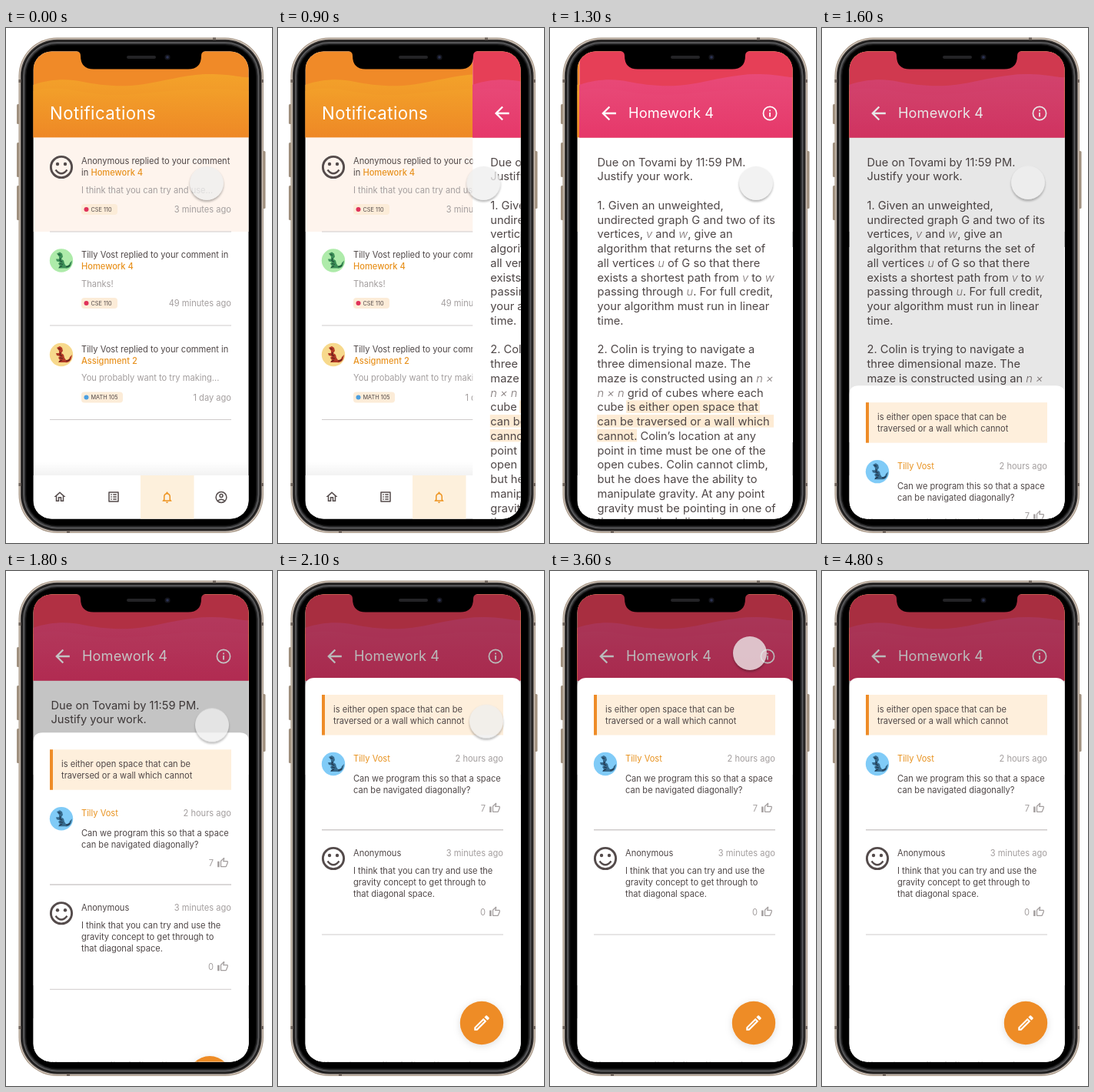
An HTML page for the animation above (4.9 s loop, 346x670 px).

```html
<!DOCTYPE html>
<html lang="en">
<head>
<meta charset="utf-8">
<title>Class notifications</title>
<style>
html, body { margin: 0; width: 100%; height: 100%; overflow: hidden; background: #fff; }
svg { display: block; width: 346px; height: 670px; font: 11.1px Inter, Roboto, sans-serif; }
text { fill: #4f4747; white-space: pre; }
.soft { fill: #a39e9e; }
.accent { fill: #e8921f; }
.link { fill: #e8921f; font-weight: 500; }
.tag { font-size: 7.3px; }
.head { font-size: 22.2px; letter-spacing: .45px; fill: #fff; }
.title { font-size: 18.2px; letter-spacing: .1px; fill: #fff; }
.body text { font-size: 14.65px; }
.var { font-style: italic; font-weight: 300; fill: #7d7474; }
</style>
</head>
<body>
<svg id="stage" viewBox="0 0 346 670"></svg>
<script>
const LOOP = 4900, TICK = 100;
const INK = '#544b4b', GREY = '#a39e9e', ORANGE = '#ee8c28', CREAM = '#feefdc';
const AUTHOR = 'Tilly Vost';

const ICONS = {
  home: 'M12 5.69l5 4.5V18h-2v-6H9v6H7v-7.81l5-4.5M12 3L2 12h3v8h6v-6h2v6h6v-8h3z',
  list: 'M19 5v14H5V5h14m1.1-2H3.9c-.5 0-.9.4-.9.9v16.2c0 .4.4.9.9.9h16.2c.4 0 .9-.5.9-.9V3.9c0-.5-.5-.9-.9-.9zM11 7h6v2h-6zm0 4h6v2h-6zm0 4h6v2h-6zM7 7h2v2H7zm0 4h2v2H7zm0 4h2v2H7z',
  bell: 'M12 22c1.1 0 2-.9 2-2h-4c0 1.1.9 2 2 2zm6-6v-5c0-3.07-1.63-5.64-4.5-6.32V4c0-.83-.67-1.5-1.5-1.5s-1.5.67-1.5 1.5v.68C7.64 5.36 6 7.92 6 11v5l-2 2v1h16v-1zm-2 1H8v-6c0-2.48 1.51-4.5 4-4.5s4 2.02 4 4.5z',
  thumb: 'M9 21h9c.83 0 1.54-.5 1.84-1.22l3.02-7.05c.09-.23.14-.47.14-.73v-2c0-1.1-.9-2-2-2h-6.31l.95-4.57.03-.32c0-.41-.17-.79-.44-1.06L14.17 1 7.58 7.59C7.22 7.95 7 8.45 7 9v10c0 1.1.9 2 2 2zM9 9l4.34-4.34L12 10h9v2l-3 7H9zM1 9h4v12H1z',
  pencil: 'M14.06 9.02l.92.92L5.92 19H5v-.92l9.06-9.06M17.66 3c-.25 0-.51.1-.7.29l-1.83 1.83 3.75 3.75 1.83-1.83c.39-.39.39-1.02 0-1.41l-2.34-2.34c-.2-.2-.45-.29-.71-.29zm-3.6 3.19L3 17.25V21h3.75L17.81 9.94z',
  back: 'M20 11H7.83l5.59-5.59L12 4l-8 8 8 8 1.41-1.41L7.83 13H20z'
};

const icon = (name, x, y, size, fill) =>
  `<path d="${ICONS[name]}" fill="${fill}" transform="translate(${x} ${y}) scale(${size / 24}) translate(-12 -12)"/>`;
const text = (x, y, s, cls = '', end = false) =>
  `<text x="${x}" y="${y}" class="${cls}"${end ? ' text-anchor="end"' : ''}>${s}</text>`;
const rect = (x, y, w, h, fill, rx = 0) =>
  `<rect x="${x}" y="${y}" width="${w}" height="${h}" fill="${fill}" rx="${rx}"/>`;
const disc = (x, y, r, fill) => `<circle cx="${x}" cy="${y}" r="${r}" fill="${fill}"/>`;
const ring = (x, y, r, stroke, w) =>
  `<circle cx="${x}" cy="${y}" r="${r}" fill="none" stroke="${stroke}" stroke-width="${w}"/>`;
const rule = (y, w = 1) => rect(57, y, 236, w, '#cfcbcb');
const band = (y, h, fill) => rect(35.5, y, 281, h, fill);
const fade = (id, top, bottom) =>
  `<linearGradient id="${id}" x2="0" y2="1"><stop stop-color="${top}"/><stop offset="1" stop-color="${bottom}"/></linearGradient>`;

const smiley = (x, y) => `<g transform="translate(${x} ${y})">
  ${ring(0, 0, 13.6, INK, 2.9)}${disc(-5, -4, 2.2, INK)}${disc(5, -4, 2.2, INK)}
  <path d="M-7.5 3.5Q0 13 7.5 3.5" fill="none" stroke="${INK}" stroke-width="2.4"/></g>`;

const dragon = (x, y, back, skin, dark) => `<g transform="translate(${x} ${y})">
  ${disc(0, 0, 15.2, back)}
  <path d="M-6-9l4-2 3 2 1 4-2 3 3 2 1 4 2 3q4 0 5-4l3-3-1 5q-2 6-8 5l-9 0 2-3-2-3 2-2-4-1-1-3 4 0 0-3z" fill="${skin}"/>
  <path d="M-4-8l3 1M-1-3l-1 3 3 2M-2 4l4 1M-3 9l4-2M6 8q4 0 5-2" fill="none" stroke="${dark}" stroke-width="1.2"/></g>`;

const header = (base, wave) => band(30, 112.5, base) +
  `<path d="M35 74C60 66 80 66 100 70S150 78 180 73S240 59 270 60S306 65 317 64V142.5H35z" fill="url(#${wave})"/>
   <path d="M35 82C70 72 95 86 140 87S230 74 317 82V142.5H35z" fill="url(#${wave})" opacity=".5"/>`;

function notice(y, avatar, lines, preview, course, dot, pill, time) {
  return avatar + text(98, y + 34, lines[0]) + text(98, y + 49, lines[1]) +
    text(98, y + 71.5, preview, 'soft') +
    rect(98, y + 86, pill, 14, '#fcecd8', 4) + disc(104.5, y + 93, 3, dot) +
    text(110.5, y + 95.7, course, 'tag') + text(293, y + 97, time, 'soft', true) + rule(y + 121.5);
}

const link = s => `<tspan class="link">${s}</tspan>`;
const replied = AUTHOR + ' replied to your comment in';

const inbox = band(30, 610, '#fff') + header('#f08a28', 'gold') +
  text(57, 118.5, 'Notifications', 'head') +
  band(142.5, 122.5, '#fef4ed') +
  notice(143, smiley(72, 181), ['Anonymous replied to your comment', 'in ' + link('Homework 4')],
    'I think that you can try and use...', 'CSE 110', '#e0325a', 47, '3 minutes ago') +
  notice(265, dragon(72, 302.5, '#aeebaa', '#3c8f57', '#1f4d36'), [replied, link('Homework 4')],
    'Thanks!', 'CSE 110', '#e0325a', 47, '49 minutes ago') +
  notice(387.5, dragon(72, 425, '#f7d98c', '#b23a26', '#5e1f1a'), [replied, link('Assignment 2')],
    'You probably want to try making...', 'MATH 105', '#4c9fe0', 54, '1 day ago') +
  band(564, 18, 'url(#lift)') + band(582, 58, '#fff') + rect(175, 582, 69.5, 58, '#fdf0dc') +
  icon('home', 70, 610, 18, INK) + icon('list', 140, 610, 18, INK) + icon('bell', 209.5, 610.5, 18, '#ee9420') +
  ring(280, 610.5, 6.9, INK, 1.5) + ring(280, 608.5, 2, INK, 1.5) +
  `<path d="M275.5 615Q280 611.5 284.5 615" fill="none" stroke="${INK}" stroke-width="1.5"/>`;

// _x_ marks a variable
const TASK = [
  'Due on Tovami by 11:59 PM.', 'Justify your work.', '',
  '1. Given an unweighted,', 'undirected graph G and two of its', 'vertices, _v_ and _w_, give an',
  'algorithm that returns the set of', 'all vertices _u_ of G so that there',
  'exists a shortest path from _v_ to _w_', 'passing through _u_. For full credit,',
  'your algorithm must run in linear', 'time.', '',
  '2. Colin is trying to navigate a', 'three dimensional maze. The', 'maze is constructed using an _n ×_',
  '_n × n_ grid of cubes where each', 'cube is either open space that', 'can be traversed or a wall which',
  'cannot. Colin’s location at any', 'point in time must be one of the', 'open cubes. Colin cannot climb,',
  'but he does have the ability to', 'manipulate gravity. At any point', 'gravity must be pointing in one of',
  'the six cardinal directions at any'
];
const lineY = i => 179.6 + 18.75 * i;
const task = band(30, 610, '#fff') + header('#e63f57', 'rose') +
  icon('back', 73.5, 111, 28, '#fff') + text(99, 117, 'Homework 4', 'title') +
  ring(283, 111, 8.6, '#fff', 1.7) + rect(282.1, 110, 1.8, 5.5, '#fff') + rect(282.1, 106.5, 1.8, 1.9, '#fff') +
  [[17, 96, 174], [18, 58, 230], [19, 58, 52]].map(([i, x, w]) =>
    rect(x, lineY(i) - 14, w, 16.5, '#fdebd4')).join('') +
  '<g class="body">' + TASK.map((s, i) =>
    text(58.5, lineY(i), s.replace(/_(.+?)_/g, '<tspan class="var">$1</tspan>'))).join('') + '</g>';

const comment = (y, avatar, name, cls, time, lines, gap, likes) =>
  avatar + text(98, y, name, cls) + text(293, y, time, 'soft', true) +
  lines.map((s, i) => text(98, y + gap + 15 * i, s)).join('') +
  text(270, y + gap + 15 * lines.length + 9.2, likes, 'soft', true) +
  icon('thumb', 282, y + gap + 15 * lines.length + 4.6, 15, GREY);

const sheet = '<path d="M35.5 640V151q0-12 12-12H304q12 0 12 12V640z" fill="#fff"/>' +
  rect(57, 161, 236, 52.5, CREAM) + rect(57, 161, 4, 52.5, ORANGE) +
  text(72, 184, 'is either open space that can be') + text(72, 199, 'traversed or a wall which cannot') +
  comment(247.7, dragon(72, 251, '#80cbf7', '#35698c', '#22354a'), AUTHOR, 'accent', '2 hours ago',
    ['Can we program this so that a space', 'can be navigated diagonally?'], 26, '7') +
  rule(336, 1.5) +
  comment(371, smiley(72, 374), 'Anonymous', '', '3 minutes ago',
    ['I think that you can try and use the', 'gravity concept to get through to', 'that diagonal space.'], 22.7, '0') +
  rule(472.5) +
  `<g filter="url(#glow)">${disc(265, 588, 28.2, ORANGE)}</g>` + icon('pencil', 265, 588, 26, '#fff');

// nested outlines of the phone body: inset, colour
const outline = ([d, fill]) => rect(16.5 + d, 12.5 + d, 318.5 - 2 * d, 644.5 - 2 * d, fill, 50 - d);
const shell = [[14, 99, 26], [14, 149, 45], [14, 205, 45], [334, 160, 75]]
  .map(([x, y, h]) => rect(x, y, 3.5, h, '#a0907f', 1.5)).join('') +
  [[0, '#a89888'], [1.3, '#e0d5cb'], [2.3, '#4a4542'], [3.5, '#1c1b1b'], [5.5, '#5c5c5e'], [7, '#3a3a3c'], [8.5, '#111'], [10, '#000']]
    .map(outline).join('') +
  [[16.5, 67, 3, 4], [332, 67, 3, 4], [16.5, 592, 3, 4], [332, 592, 3, 4], [269, 12.5, 4, 3], [79, 654, 4, 3]]
    .map(b => rect(...b, '#6f645c')).join('');

const notch = '<path d="M92 30q5 1 5 6q0 17.5 17 17.5H237q17 0 17-17.5q0-5 5-6z" fill="#000"/>' +
  rect(157, 36, 38, 4, '#232326', 2) + disc(210, 38, 3.6, '#14151c') + disc(210, 38, 1.8, '#2b3354');

document.getElementById('stage').innerHTML = `<defs>
  ${fade('gold', '#f3a22a', '#ee8826')}${fade('rose', '#e84a78', '#e6386a')}
  <linearGradient id="lift" x2="0" y2="1"><stop stop-color="#000" stop-opacity="0"/><stop offset="1" stop-color="#000" stop-opacity=".05"/></linearGradient>
  <filter id="glow" x="-50%" y="-50%" width="200%" height="200%"><feDropShadow dx="0" dy="2" stdDeviation="5" flood-opacity=".13"/></filter>
  <filter id="blur" x="-50%" y="-50%" width="200%" height="200%"><feGaussianBlur stdDeviation="1.8"/></filter>
  <clipPath id="screen"><rect x="35.5" y="30.5" width="280" height="608" rx="24"/></clipPath>
  <mask id="outside"><rect x="-40" y="-40" width="80" height="80" fill="#fff"/><circle r="21.8"/></mask>
  </defs>${shell}
  <g clip-path="url(#screen)">${inbox}
    <g id="task">${task}</g>
    <rect id="dim" x="35" y="30" width="282" height="610"/>
    <g id="sheet">${sheet}</g>
  </g>${notch}
  <g id="touch"><g mask="url(#outside)"><circle cy="2" r="21.8" opacity=".32" filter="url(#blur)"/></g>
    <circle r="22" fill="#eeeeef" opacity=".77"/></g>`;

const move = (x, y) => ({ transform: `translate(${x}px, ${y}px)` });
const tracks = [];
// steps: [ms, properties, easing]
function track(id, steps) {
  const frames = steps.map(([ms, props, easing = 'linear']) => ({ offset: ms / LOOP, easing, ...props }));
  frames.push({ ...frames[frames.length - 1], offset: 1 });
  const anim = document.getElementById(id).animate(frames, { duration: LOOP, fill: 'both' });
  anim.pause();
  tracks.push(anim);
}
const glide = 'ease-in-out';
track('task', [[0, move(281, 0)], [680, move(281, 0), glide], [1350, move(0, 0)]]);
track('dim', [[0, { opacity: 0 }], [1350, { opacity: 0 }, glide], [1960, { opacity: 0.27 }]]);
track('sheet', [[0, move(0, 500)], [1350, move(0, 500), glide], [1960, move(0, 0)]]);
track('touch', [
  [0, move(261, 202)], [700, move(267, 202)], [1300, move(268, 202)], [1800, move(268, 200.5), 'ease-in'],
  [2800, move(290.5, 163)], [3200, move(282, 136)], [3600, move(260, 107), 'ease-in'], [4200, move(222, -40)]
]);

const start = performance.now();
function draw() {
  const t = (performance.now() - start) % LOOP;
  const held = Math.floor(t / TICK) * TICK;
  for (const anim of tracks) anim.currentTime = held;
  requestAnimationFrame(draw);
}
draw();
</script>
</body>
</html>
```
